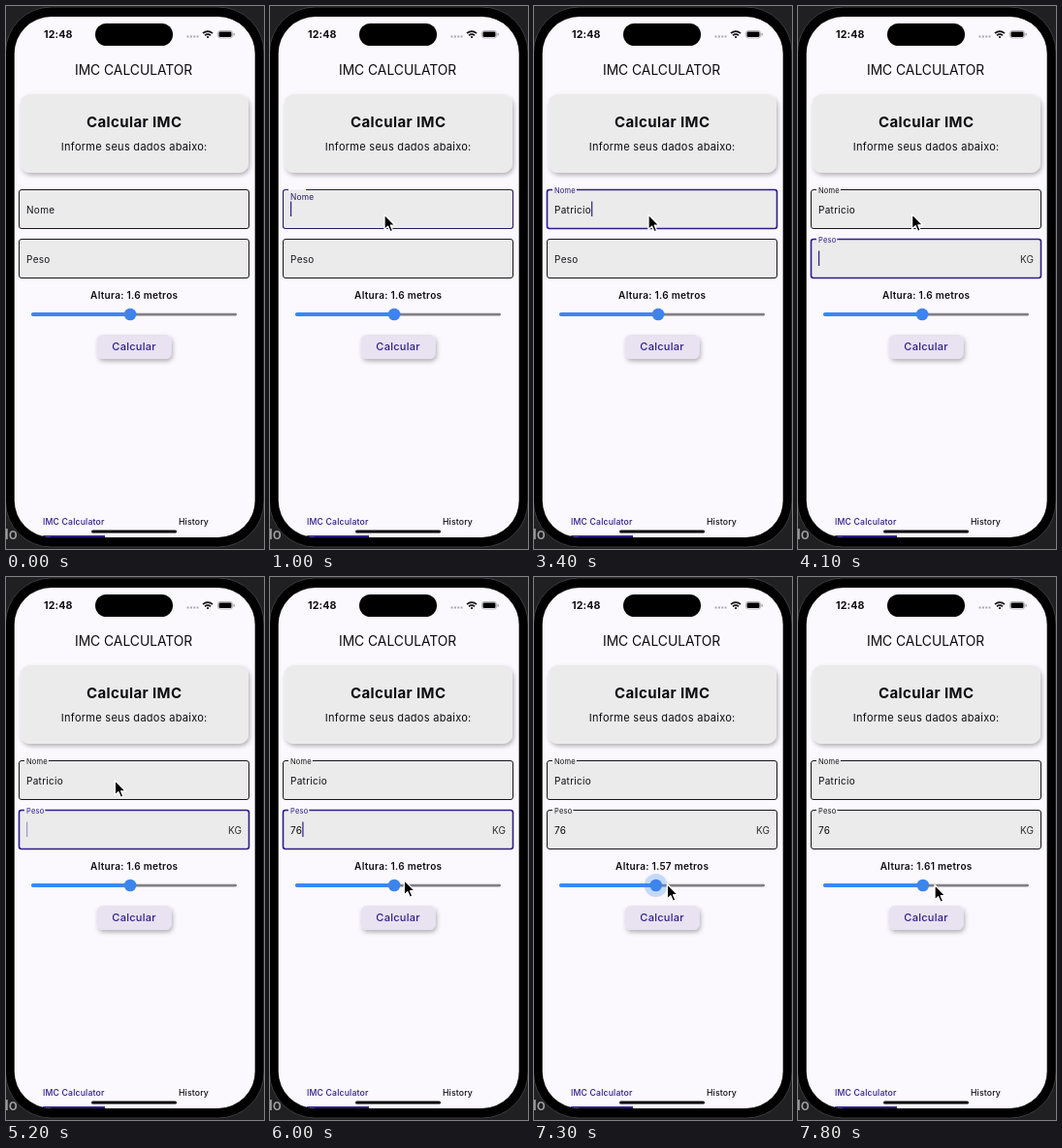
Animation, 266 px wide and 560 px high, one loop 8000 ms. Source, as an HTML page:

```html
<!DOCTYPE html>
<html lang="pt">
<head>
<meta charset="utf-8">
<title>IMC Calculator</title>
<style>
html, body { margin: 0; width: 100%; height: 100%; overflow: hidden; background: #202022; }
svg { display: block; width: 266px; height: 560px; }
text { font-family: Inter, "Liberation Sans", sans-serif; fill: #0c0b0f; white-space: pre; }
.mid { text-anchor: middle; }
.body { font-size: 10px; letter-spacing: .3px; }
.tab { font-size: 8.7px; font-weight: 500; letter-spacing: .15px; }
.purple { fill: #2f1d88; }
</style>
</head>
<body>
<svg viewBox="0 0 266 560">
  <defs>
    <filter id="soft" x="-20%" y="-20%" width="140%" height="150%">
      <feDropShadow dx="1.5" dy="2.5" stdDeviation="2.2" flood-color="#000" flood-opacity=".28"/>
    </filter>
    <clipPath id="screen"><rect x="8.7" y="11" width="248" height="537" rx="38"/></clipPath>
  </defs>

  <!-- phone -->
  <text x="-1" y="550" font-size="15" font-weight="500" style="fill:#a5a5a7">lo</text>
  <rect x="-.5" y="1" width="266.5" height="557" rx="47" stroke="#3c3c3e"/>
  <g clip-path="url(#screen)">
    <rect width="266" height="560" fill="#fbf8fe"/>
    <text class="tab purple" x="38" y="535">IMC Calculator</text>
    <text class="tab" x="178" y="535">History</text>
    <rect x="38" y="546" width="64" height="2" fill="#2f1d88"/>
    <rect x="88" y="540.5" width="88" height="3" rx="1.5"/>
  </g>
  <rect x="92" y="18" width="80" height="23" rx="11.5"/>

  <!-- status bar -->
  <text x="39" y="33" font-size="10.7" font-weight="700" letter-spacing=".1">12:48</text>
  <path d="M186.5 31.5h12" stroke="#aaa" stroke-width="2" stroke-dasharray="2 1.4"/>
  <g fill="none" stroke="#111" stroke-width="1.7">
    <path d="M203 28.2q5-4.2 10 0M205 30.3q3-2.4 6 0"/>
    <path d="M207 32.2h2"/>
  </g>
  <rect x="218.5" y="25.5" width="15" height="7.5" rx="2.2" fill="none" stroke="#aaa" stroke-width=".8"/>
  <rect x="219.5" y="26.5" width="13" height="5.5" rx="1.3"/>
  <rect x="234.5" y="27.8" width="1.2" height="3" rx=".6" fill="#999"/>

  <!-- page -->
  <text class="mid" x="131.6" y="71" font-size="13.8">IMC CALCULATOR</text>
  <rect x="14.5" y="91" width="235.5" height="81" rx="10" fill="#ebebeb" filter="url(#soft)"/>
  <text class="mid" x="132.2" y="125" font-size="15" font-weight="700" letter-spacing=".4">Calcular IMC</text>
  <text class="mid" x="132.2" y="148.5" font-size="11" letter-spacing=".28">Informe seus dados abaixo:</text>
  <g id="fields"></g>
  <text class="mid" id="height" x="132.2" y="302" font-size="10" font-weight="600" letter-spacing=".3"></text>
  <rect x="26" y="316.8" width="212" height="2.6" rx="1.3" fill="#808084"/>
  <rect id="active" x="26" y="316" width="102" height="4" rx="2" fill="#3b88f3"/>
  <circle id="halo" cy="318" r="12" fill="#3b88f3"/>
  <circle id="thumb" cy="318" r="6.3" fill="#3d84ec"/>
  <rect x="93.5" y="339" width="77" height="25" rx="6" fill="#e8e2f1" filter="url(#soft)"/>
  <text class="mid purple" x="132" y="355" font-size="11" font-weight="500" letter-spacing=".25">Calcular</text>

  <path id="cursor" d="M0 0V15.5L3.6 12.2 6 17.8 8.6 16.7 6.3 11.2H11Z" stroke="#fff" stroke-width="1.3" stroke-linejoin="round"/>
</svg>
<script>
const LOOP = 8000;
const $ = id => document.getElementById(id);
const clamp = x => Math.min(1, Math.max(0, x));
const mix = (a, b, p) => a + (b - a) * p;
const ramp = (t, start, span) => clamp((t - start) / span);
const easeOut = p => 1 - (1 - p) ** 2;
const smooth = p => p * p * (3 - 2 * p);

function set(el, attrs) {
  for (const k in attrs) el.setAttribute(k, attrs[k]);
}
function make(parent, tag, attrs, text = '') {
  const el = document.createElementNS('http://www.w3.org/2000/svg', tag);
  set(el, attrs);
  el.textContent = text;
  return parent.appendChild(el);
}

// Interpolates rows of [time, ...values].
function track(keys, t) {
  const i = keys.findIndex(k => k[0] > t);
  if (i < 0) return keys.at(-1).slice(1);
  if (i === 0) return keys[0].slice(1);
  const a = keys[i - 1], b = keys[i];
  const p = smooth(ramp(t, a[0], b[0] - a[0]));
  return a.slice(1).map((v, j) => mix(v, b[j + 1], p));
}

// Ink runs from near black (0) to the focus purple (1).
const ink = f => `rgb(${mix(22, 45, f)},${mix(21, 28, f)},${mix(26, 136, f)})`;

// The caret fades out and back in once a second.
function caretAlpha(age) {
  const p = age % 1000;
  return Math.max(1 - ramp(p, 500, 170), ramp(p, 840, 160));
}

function field(y, label, value, focus, blur, keys, unit) {
  const h = 40;
  const g = make($('fields'), 'g', {});
  make(g, 'rect', { x: 13.5, y, width: 237, height: h, rx: 2.5, fill: '#ebebeb' });
  const border = make(g, 'path', { fill: 'none' });
  const name = make(g, 'text', { x: 21 }, label);
  const text = make(g, 'text', { x: 21, y: y + 24, class: 'body' });
  const suffix = make(g, 'text', { x: 229, y: y + 24.5, 'font-size': 10 }, unit);
  const caret = make(g, 'rect', { y: y + 12, width: 1.2, height: 15.5, fill: '#2f1d88' });

  return t => {
    const float = easeOut(ramp(t, focus - 70, 170));
    const lit = float * (1 - ramp(t, blur - 70, 170));
    const typed = keys.filter(k => k <= t);
    set(name, {
      y: y + mix(24, 3, float),
      'font-size': mix(10, 7.5, float),
      'letter-spacing': mix(.3, .2, float),
      style: `fill:${ink(lit)}`
    });
    const gap = 19 + (name.getComputedTextLength() + 3) * float;
    set(border, {
      d: `M${gap} ${y}H248q2.5 0 2.5 2.5v${h - 5}q0 2.5-2.5 2.5H16q-2.5 0-2.5-2.5V${y + 2.5}q0-2.5 2.5-2.5H19` + (float ? '' : 'Z'),
      stroke: ink(lit),
      'stroke-width': mix(1, 1.6, lit * float ** 3)
    });
    text.textContent = value.slice(0, typed.length);
    suffix.setAttribute('opacity', float * .85);
    const last = typed.at(-1) ?? focus;
    set(caret, {
      x: 21 + (typed.length ? text.getComputedTextLength() : 0),
      opacity: t >= focus && t < blur ? caretAlpha(t - last) : 0
    });
  };
}

const fields = [
  field(189.5, 'Nome', 'Patricio', 1000, 3600, [2300, 2500, 2700, 2800, 3000, 3100, 3300, 3400], ''),
  field(240.5, 'Peso', '76', 3600, 6100, [5400, 5600], 'KG')
];

const pointer = [
  [100, 150, 535], [700, 118, 215], [4000, 118, 215], [4600, 112.3, 209.6],
  [5550, 112.3, 209.6], [6050, 139, 315.3], [6200, 139, 315.3], [6500, 133, 315.3],
  [6800, 133, 315.3], [7750, 141, 317.5]
];
const metres = [[6200, 1.6], [6500, 1.53], [6800, 1.53], [7750, 1.61]];

function draw(t) {
  fields.forEach(f => f(t));

  const value = Math.round(track(metres, t)[0] * 100) / 100;
  const x = 26 + 212 * (value - .3) / 2.7;
  $('height').textContent = `Altura: ${value} metros`;
  $('active').setAttribute('width', x - 26);
  $('thumb').setAttribute('cx', x);
  set($('halo'), { cx: x, opacity: .28 * ramp(t, 6150, 150) * (1 - ramp(t, 7650, 150)) });

  const [px, py] = track(pointer, t);
  set($('cursor'), { transform: `translate(${px} ${py})`, opacity: t < 100 ? 0 : 1 });
}

const start = performance.now();
function tick() {
  draw((performance.now() - start) % LOOP);
  requestAnimationFrame(tick);
}
tick();
</script>
</body>
</html>
```
